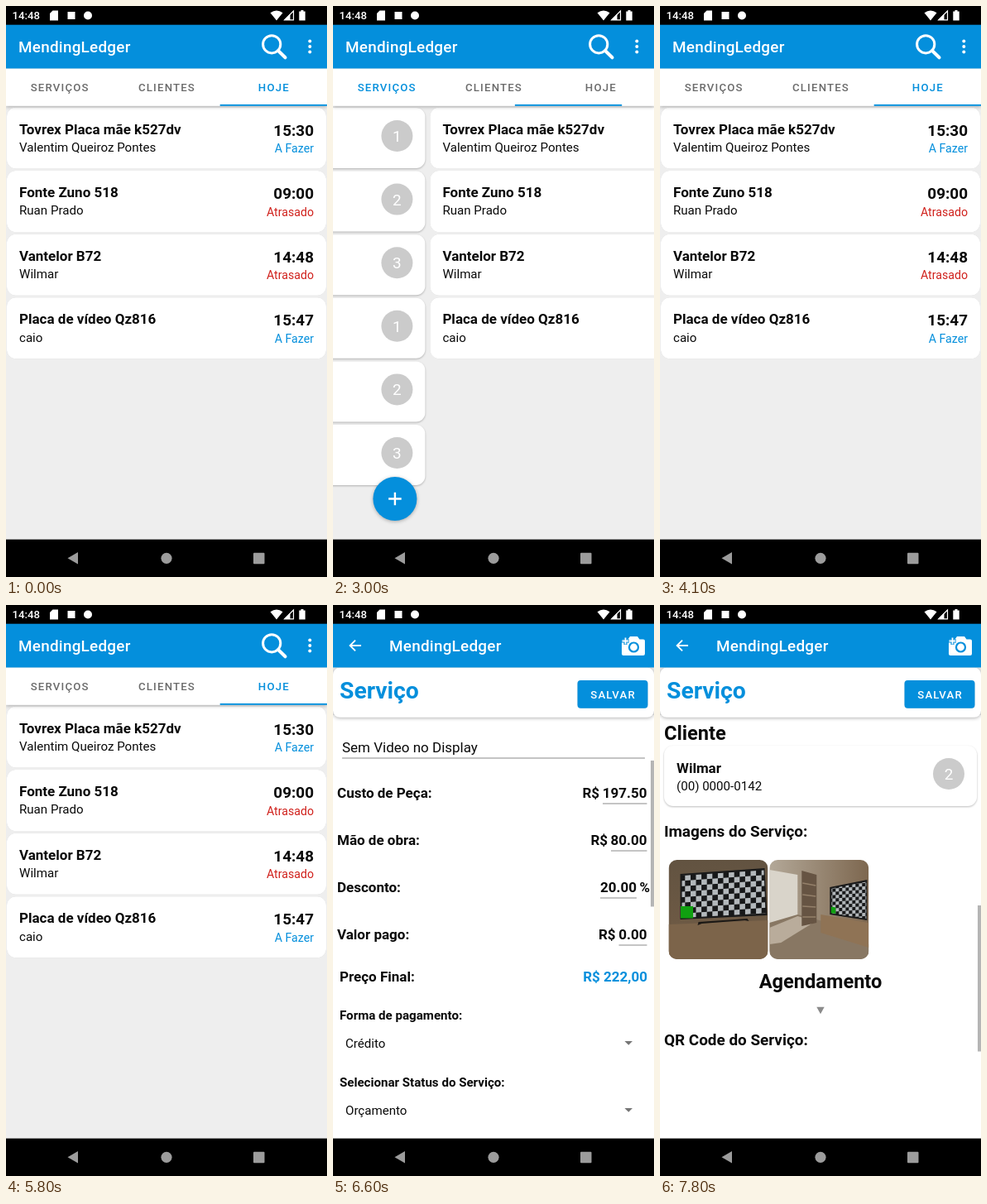
Recreate the animation shown at these times as an HTML page. Size 388 by 690 pixels, loop 8000 ms.

```html
<!DOCTYPE html>
<html lang="pt">
<head>
<meta charset="utf-8">
<title>Serviços</title>
<style>
html, body { margin: 0; width: 100%; height: 100%; overflow: hidden; background: #000; }
svg { display: block; width: 100vw; height: 100vh; font-family: Roboto, "Noto Sans", sans-serif; }
.card { fill: #fff; filter: drop-shadow(0 .5px .7px rgba(0,0,0,.16)); }
.client { fill: #fff; filter: drop-shadow(0 1px 1.2px rgba(0,0,0,.26)); }
.raised { filter: drop-shadow(0 1.5px 2px rgba(0,0,0,.3)); }
.caps { font-weight: 500; font-size: 13.2px; letter-spacing: 1.18px; }
.title { font-weight: 500; font-size: 18.9px; letter-spacing: .24px; fill: #fff; }
</style>
</head>
<body>
<svg id="stage" viewBox="0 0 388 690" xmlns="http://www.w3.org/2000/svg"></svg>
<script>
const BLUE = '#048fdc', RED = '#d0211c', GRAY = '#a3a3a3', PURPLE = '#4a1bb0', INK = '#0a0a0a';
const APP = 'MendingLedger';
const LOOP = 8000, STEP = 100, WIDTH = 388, TAB = WIDTH / 3;
const stage = document.getElementById('stage');

const rect = (x, y, w, h, fill, r = 0, more = '') =>
  `<rect x="${x}" y="${y}" width="${w}" height="${h}" rx="${r}" fill="${fill}" ${more}/>`;
const circle = (x, y, r, fill, more = '') =>
  `<circle cx="${x}" cy="${y}" r="${r}" fill="${fill}" ${more}/>`;
const path = (d, fill, more = '') => `<path d="${d}" fill="${fill}" ${more}/>`;
const line = (d, color, width, more = '') =>
  path(d, 'none', `stroke="${color}" stroke-width="${width}" ${more}`);
const text = (x, y, s, size, { bold, fill = INK, end, mid } = {}) =>
  `<text x="${x}" y="${y}" font-size="${size}" font-weight="${bold ? 700 : 400}" fill="${fill}"
    text-anchor="${end ? 'end' : mid ? 'middle' : 'start'}">${s}</text>`;

function card(i, [name, who, value, state, color]) {
  const y = i * 76.6;
  return rect(1, 122.5 + y, 386, 74, '#fff', 11, 'class="card"') +
    text(16, 154.6 + y, name, 17, { bold: true }) +
    text(16, 175.7 + y, who, 15.1) +
    text(372, 156.6 + y, value, 18.9, { bold: true, end: true }) +
    text(372, 176.9 + y, state, 14.16, { fill: color, end: true });
}

function clientCard(y, name, phone, count) {
  return rect(5, y, 378, 73, '#fff', 11, 'class="client"') +
    text(20, y + 33, name, 17, { bold: true }) +
    text(20, y + 54, phone, 15.1) +
    circle(349, y + 34, 19, '#cbcbcb') +
    text(349, y + 41, count, 18.9, { fill: '#fff', mid: true });
}

const services = [
  ['Tovrex Placa mãe k527dv', 'Valentim Queiroz Pontes', 'R$100,00', 'Autorizado', BLUE],
  ['Nurb Calvidex 247', 'Ruan Prado', 'R$199,99', 'Autorizado', BLUE],
  ['Fonte Zuno 518', 'Ruan Prado', 'R$142,50', 'Orçamento', GRAY],
  ['O Flune 63', 'Renata', 'R$0,00', 'Orçamento', GRAY],
  ['Vantelor B72', 'Wilmar', 'R$222,00', 'Orçamento', GRAY],
  ['OFlune 57', 'Camila', 'R$108,00', 'Sem conserto', RED],
  ['VU Z58', 'Ruan Prado', 'R$600,00', 'Bancada', PURPLE]
];
const today = [
  ['Tovrex Placa mãe k527dv', 'Valentim Queiroz Pontes', '15:30', 'A Fazer', BLUE],
  ['Fonte Zuno 518', 'Ruan Prado', '09:00', 'Atrasado', RED],
  ['Vantelor B72', 'Wilmar', '14:48', 'Atrasado', RED],
  ['Placa de vídeo Qz816', 'caio', '15:47', 'A Fazer', BLUE]
];
const clients = ['Wilmar', 'Renata', 'Valentim Queiroz Pontes', 'caio', 'Ruan Prado', 'Camila'];

const fab = circle(346.5, 595.5, 26.5, BLUE, 'class="raised"') +
  line('M338.7 595.5h15.6M346.5 587.7v15.6', '#fff', 2.4);

const pages = [
  services.map((s, i) => card(i, s)).join('') + rect(384, 121, 4, 256, '#adadad') + fab,
  clients.map((c, i) => clientCard(123 + i * 76.6, c, `(00) 0000-01${42 + i}`, i % 3 + 1)).join('') + fab,
  today.map((s, i) => card(i, s)).join('')
];

const statusBar = rect(0, 0, WIDTH, 22.7, '#000') +
  '<text x="7.5" y="16.3" font-size="13.2" font-weight="500" fill="#fff">14:48</text>' +
  path('M56.5 5.5H63V17.5H53V9Z', '#fff') +
  rect(74.5, 7, 9, 9, '#fff') + circle(99, 11.5, 5, '#fff') +
  path('M319.5 8.2Q327 2.8 334.5 8.2L327 17.5Z', '#fff') +
  line('M347.5 6V16.8H336.7Z', '#fff', 1.2) + path('M343.5 9.5V17H336Z', '#fff') +
  path('M356.5 5h3v1.5h2.2V17.5h-7.4V6.5h2.2Z', '#fff');

const navBar = rect(0, 644.6, WIDTH, 46, '#000') +
  path('M87 660V674.5L74.5 667.2Z', '#9c9c9c') + circle(194, 667.3, 6.6, '#9c9c9c') +
  rect(299, 660.7, 13.5, 13.5, '#9c9c9c', 1);

const homeBar = rect(0, 22, WIDTH, 53.5, BLUE) +
  `<text class="title" x="15" y="56">${APP}</text>` +
  circle(321.2, 46.3, 10.6, 'none', 'stroke="#fff" stroke-width="3"') +
  line('M329 54L337.5 62.3', '#fff', 4, 'stroke-linecap="round"') +
  [42.5, 49, 55.5].map(y => circle(367.3, y, 2, '#fff')).join('');

const tabs = rect(0, 75.5, WIDTH, 45.3, '#fff', 0, 'class="raised"') +
  ['SERVIÇOS', 'CLIENTES', 'HOJE'].map((s, i) =>
    `<text class="caps tab" x="${TAB * (i + .5) + .5}" y="103.3" text-anchor="middle">${s}</text>`).join('') +
  `<rect id="mark" y="118.9" width="${TAB}" height="1.9" fill="${BLUE}"/>`;

function field(y, label, value, from, to) {
  return text(5, y, label, 17, { bold: true }) +
    text(to, y, value, 17, { bold: true, end: true }) +
    line(`M${from} ${y + 7}H${to}`, '#8a8a8a', 1);
}
const money = (y, label, value, from) =>
  field(y, label, value, from, 379.5) + text(from - 4, y, 'R$', 17, { bold: true, end: true });
const select = (y, label, value) =>
  text(8, y, label, 15.1, { bold: true }) + text(15, y + 33.5, value, 15.1) +
  path(`M352.5 ${y + 26}h9.5l-4.7 4.8Z`, '#757575');

// Rooms sketched in flat shapes, 120 by 120 each
const photoWall = rect(0, 0, 120, 120, 'url(#wall)') +
  path('M0 78L120 73V120H0Z', '#7c644a') +
  path('M36 75L95 71L97 74L92 73L40 77L35 79Z', '#1b1815') +
  path('M14 17L116 10L119 67L14 72Z', '#1a1a1a') +
  path('M16 19L115 12.5L117 64.5L16 70Z', 'url(#bigCheck)') +
  rect(14.5, 56, 15, 14.5, '#10a010');
const photoRoom = rect(0, 0, 120, 120, 'url(#room)') +
  path('M0 12L34 18V68L0 78Z', '#d9d4ca') +
  path('M0 76L34 66L64 74L120 102V120H0Z', '#887763') +
  path('M0 82L34 68L56 74L14 100L0 102Z', '#b9ac9b') +
  path('M39 13L57 18V76L39 80Z', '#665443') +
  line('M40 28L56 31M40 42L56 44M40 56L56 57M40 69L56 69', '#94806a', 1.5) +
  path('M62 66L120 76V106L62 88Z', '#8f7355') +
  path('M73 33L118 24V73L73 66Z', '#1a1a1a') +
  path('M75 34.5L117 26.5V71L75 64.5Z', 'url(#smallCheck)') +
  path('M74.5 56.5L80 57.5V65L74.5 64.2Z', '#10a010');
const photo = (x, y, art) => `<g transform="translate(${x} ${y})" clip-path="url(#frame)">${art}</g>`;

const form =
  text(5, 14, 'Equipamento:', 17, { bold: true }) + text(11, 54, 'Vantelor B72', 17) +
  line('M11 61H377', '#8a8a8a', 1) +
  text(5, 118, 'Descrição:', 17, { bold: true }) + text(11, 178, 'Sem Video no Display', 17) +
  line('M11 185H377', '#8a8a8a', 1) +
  money(233, 'Custo de Peça:', '197.50', 326) +
  money(290, 'Mão de obra:', '80.00', 336) +
  field(347, 'Desconto:', '20.00', 323, 367) + text(383, 347, '%', 17, { bold: true, end: true }) +
  money(404, 'Valor pago:', '0.00', 345.5) +
  text(8, 455, 'Preço Final:', 17, { bold: true }) +
  text(380, 455, 'R$ 222,00', 17, { bold: true, fill: BLUE, end: true }) +
  select(501, 'Forma de pagamento:', 'Crédito') +
  select(582, 'Selecionar Status do Serviço:', 'Orçamento') +
  text(5, 668, 'Cliente', 23.6, { bold: true }) +
  clientCard(675, 'Wilmar', '(00) 0000-0142', 2) +
  text(5, 785, 'Imagens do Serviço:', 18.9, { bold: true }) +
  photo(10.5, 813, photoWall) + photo(132.3, 813, photoRoom) +
  text(194, 968, 'Agendamento', 23.6, { bold: true, mid: true }) +
  path('M189.3 990.8h9.4l-4.7 8.4Z', '#8b8b8b') +
  text(5, 1037, 'QR Code do Serviço:', 18.9, { bold: true });

const camera = path('M351 41.5h5.5l2.5-3.5h9l2.5 3.5h4.5q2 0 2 2V59q0 2-2 2H351q-2 0-2-2V43.5q0-2 2-2Z', '#fff') +
  circle(363.5, 51, 6.6, BLUE) + circle(363.5, 51, 4.4, '#fff') +
  line('M349 43.5h9M353.5 39v9', BLUE, 4) + line('M349.5 43.5h8M353.5 39.5v8', '#fff', 1.8);

const detail = rect(0, 22, WIDTH, 623, '#fff') +
  `<g id="form">${form}</g><rect id="thumb" x="384" width="4" height="176.5" fill="#b5b5b5"/>` +
  rect(0, 75, WIDTH, 58, '#e9e9e9') +
  rect(0, 75.8, WIDTH, 60, '#fff', 8, 'class="raised"') +
  rect(0, 22, WIDTH, 53.5, BLUE) +
  line('M34 49H20.8M27 42.6L20.6 49L27 55.4', '#fff', 1.9) +
  `<text class="title" x="68" y="56">${APP}</text>` + camera +
  text(8, 112.6, 'Serviço', 28.3, { bold: true, fill: BLUE }) +
  rect(295.5, 91, 85, 33.7, BLUE, 4, 'class="card" style="fill:' + BLUE + '"') +
  '<text class="caps" x="338.6" y="112.8" text-anchor="middle" fill="#fff">SALVAR</text>';

const check = (id, cell, skew) =>
  `<pattern id="${id}" width="${cell * 2}" height="${cell * 2}" patternUnits="userSpaceOnUse"
    patternTransform="skewY(${skew})">${rect(0, 0, cell * 2, cell * 2, '#171819')}
    ${rect(0, 0, cell, cell, '#b3b8bb')}${rect(cell, cell, cell, cell, '#b3b8bb')}</pattern>`;

stage.innerHTML = `<defs>
  <linearGradient id="wall" x2="0" y2="1"><stop stop-color="#625341"/><stop offset="1" stop-color="#735d46"/></linearGradient>
  <linearGradient id="room"><stop stop-color="#b3a898"/><stop offset="1" stop-color="#7d674f"/></linearGradient>
  <clipPath id="frame"><rect width="120" height="120" rx="10"/></clipPath>
  ${check('bigCheck', 6.6, -4)}${check('smallCheck', 4, -4)}</defs>
  ${rect(0, 0, WIDTH, 690, '#eee')}
  ${pages.map(p => `<g class="page">${p}</g>`).join('')}
  ${tabs}${homeBar}<g id="detail">${detail}</g>${statusBar}${navBar}`;

const find = id => document.getElementById(id);
const pageEls = [...stage.querySelectorAll('.page')];
const tabEls = [...stage.querySelectorAll('.tab')];
const mark = find('mark'), detailEl = find('detail'), formEl = find('form'), thumb = find('thumb');

// Key points as [ms, value]
const pager = [[2900, 2], [3000, 1.7], [3100, .9], [3200, .35], [3300, .08], [3400, 0],
  [3700, 0], [3800, .4], [3900, 1.3], [4000, 1.85], [4100, 2]];
const opening = [[5800, 0], [5900, .25], [6000, .7], [6100, .94], [6200, 1]];
const scrolling = [[6300, 0], [6400, 25], [6500, 80], [6600, 150], [6700, 310], [6800, 480],
  [6900, 615], [7000, 686], [7100, 686], [7200, 684], [7800, 655]];

function at(keys, t) {
  const next = keys.findIndex(k => k[0] > t);
  if (next === 0) return keys[0][1];
  if (next < 0) return keys[keys.length - 1][1];
  const [t0, a] = keys[next - 1], [t1, b] = keys[next];
  return a + (b - a) * (t - t0) / (t1 - t0);
}

function draw(t) {
  const pos = at(pager, t), open = at(opening, t), scroll = at(scrolling, t);
  const active = t >= 3000 && t < 3800 ? 0 : 2;
  pageEls.forEach((el, i) => {
    el.setAttribute('transform', `translate(${(i - pos) * WIDTH} 0)`);
    el.style.display = Math.abs(i - pos) < 1 ? '' : 'none';
  });
  tabEls.forEach((el, i) => el.setAttribute('fill', i === active ? BLUE : '#6b6b6b'));
  mark.setAttribute('x', pos * TAB);

  const size = .9 + .1 * open;
  detailEl.style.display = open ? '' : 'none';
  detailEl.setAttribute('opacity', open);
  detailEl.setAttribute('transform', `translate(194 334) scale(${size}) translate(-194 -334)`);
  formEl.setAttribute('transform', `translate(0 ${150 - scroll})`);
  thumb.setAttribute('y', 136 + scroll * 332 / 958);
}

const start = performance.now();
function tick() {
  const t = (performance.now() - start) % LOOP;
  draw(Math.floor(t / STEP) * STEP);
  requestAnimationFrame(tick);
}
tick();
</script>
</body>
</html>
```
